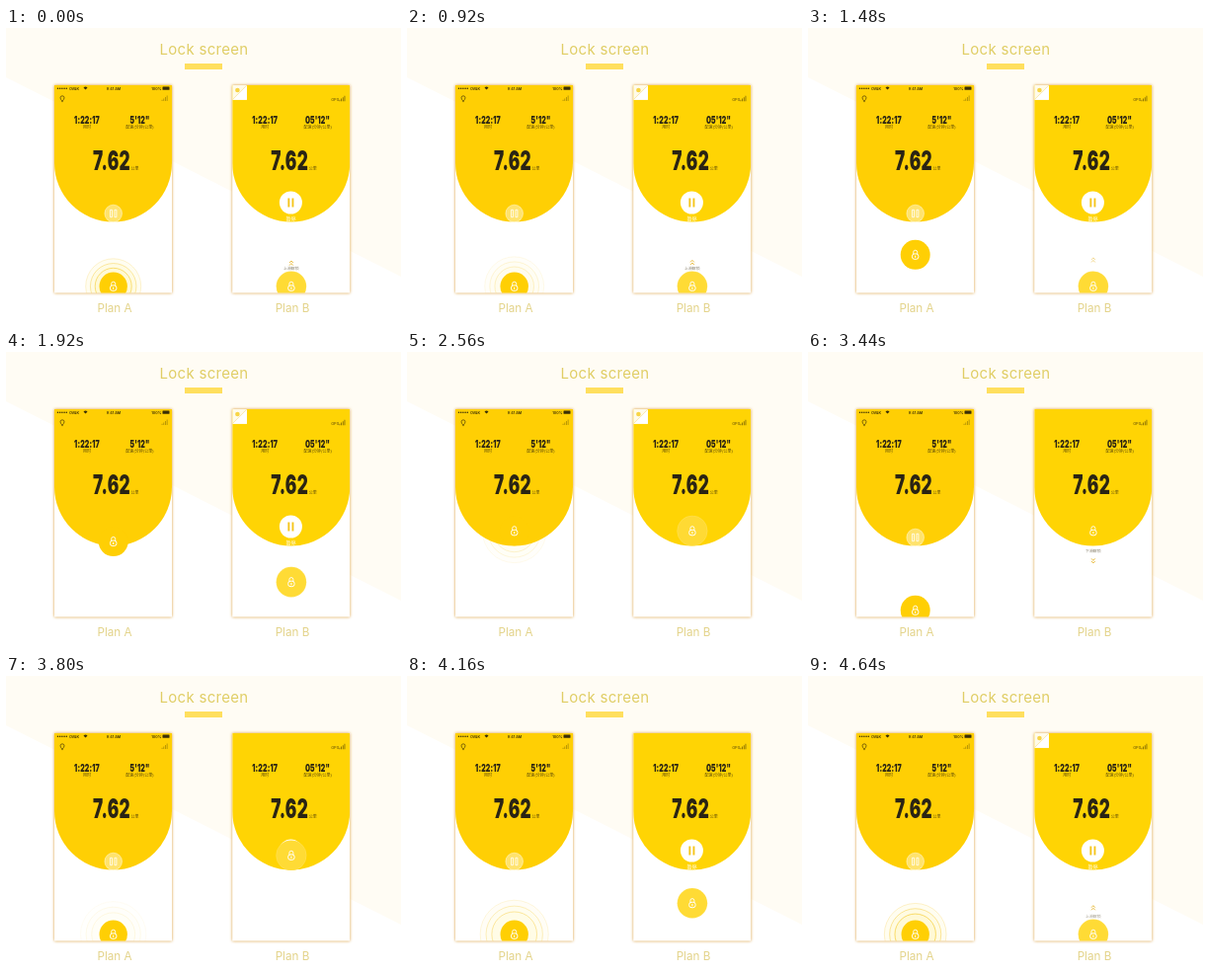
These frames come from a looping animation (400x300 px, 4680 ms). An HTML page:

```html
<!DOCTYPE html>
<html lang="en">
<head>
<meta charset="utf-8">
<title>Lock screen</title>
<style>
html, body { margin: 0; width: 100%; height: 100%; overflow: hidden; background: #fff; }
svg { display: block; width: 100%; height: 100%; }
text { font-family: Inter, "Noto Sans CJK SC", sans-serif; text-anchor: middle; }
.heavy { font-weight: 900; fill: #2a2414; letter-spacing: .02em; }
.small { font-size: 4px; fill: #5b4a08; }
.status { font-size: 3.7px; font-weight: 600; fill: #3a2f06; }
.phone { fill: #fff; filter: drop-shadow(.2px .5px 1.7px #d8962c); }
.line { fill: none; stroke-linecap: round; stroke-linejoin: round; }
.hint { font-size: 3.9px; fill: #8d8672; }
</style>
</head>
<body>
<svg viewBox="0 0 400 300">
  <defs>
    <clipPath id="clip"><rect x="49" y="58" width="119" height="210.5"/></clipPath>
    <path id="blob" d="M49 58h119v79a59.5 59.5 0 0 1-119 0z"/>
    <g id="stats"></g>
    <g id="lock">
      <path class="line" d="M-2-.9v-1.7a2 2 0 0 1 4 0v1.7" stroke="#fff" stroke-width=".9"/>
      <rect x="-3.2" y="-.9" width="6.4" height="5.4" rx="2.3" fill="none" stroke="#fff" stroke-width="1"/>
      <path class="line" d="M0 1.3v1.2" stroke="#fff" stroke-width="1.1"/>
    </g>
    <path id="chevrons" class="line" d="M-1.6-.3l1.6-1.7 1.6 1.7M-1.6 2.3l1.6-1.7 1.6 1.7" stroke="#e6b52c" stroke-width=".9"/>
    <path id="signal" d="M0 5.5v-1.4h.9v1.4zM1.7 5.5v-2.6h.9v2.6zM3.4 5.5v-4h.9v4zM5.1 5.5v-5.5h.9v5.5z" fill="#6b5705"/>
  </defs>

  <path d="M0 0h400v252L0 50z" fill="#fffcf4"/>
  <text x="200.5" y="27.3" font-size="15" letter-spacing=".3" fill="#e0ce66">Lock screen</text>
  <rect x="181" y="36" width="38" height="6" fill="#ffdf5e"/>
  <g font-size="11.7" fill="#e3d389">
    <text x="110" y="287.7">Plan A</text>
    <text x="290" y="287.7">Plan B</text>
  </g>

  <rect class="phone" x="49" y="58" width="119" height="210.5"/>
  <g clip-path="url(#clip)">
    <g id="rings" stroke="#f6cb3f" fill="#ffd200" fill-opacity=".06" stroke-width=".8"></g>
    <use href="#blob" fill="#ffcf04"/>
    <use href="#stats"/>
    <text class="heavy" transform="translate(135.5 97) scale(.64 1)" font-size="11">5'12"</text>
    <g fill="#3a2f06">
      <path d="M52.5 61.3h10" class="line" stroke="#3a2f06" stroke-width="1.6" stroke-dasharray="0 2.2"/>
      <path d="M80.5 62.6l-2-2.2q2-1.6 4 0z"/>
      <rect x="158.5" y="59.6" width="7" height="3.2" rx=".5"/>
    </g>
    <g class="status">
      <text x="69" y="62.7">OV&amp;K</text>
      <text x="109" y="62.7">9:41 AM</text>
      <text x="152.3" y="62.7">100%</text>
    </g>
    <path class="line" d="M57 74.4q-2-2.4-2-3.6a2 2 0 0 1 4 0q0 1.2-2 3.6z" stroke="#6b5705" stroke-width=".9"/>
    <use href="#signal" x="157.6" y="68.6" opacity=".5"/>
    <g id="pauseA" stroke="#fff">
      <circle cx="108.7" cy="188" r="8.8" fill="#fff" fill-opacity=".42" stroke-opacity=".6" stroke-width=".7"/>
      <path d="M105.5 184.3h2v7.4h-2zM109.9 184.3h2v7.4h-2z" fill="none" stroke-width=".8"/>
    </g>
    <g id="ballA"><circle id="discA" fill="#ffcf04"/><use href="#lock"/></g>
  </g>

  <g transform="translate(180.2)">
    <rect class="phone" x="49" y="58" width="119" height="210.5"/>
    <g clip-path="url(#clip)">
      <use href="#blob" fill="#ffd404"/>
      <use href="#stats"/>
      <text class="heavy" transform="translate(135.3 97) scale(.64 1)" font-size="11">05'12"</text>
      <text class="small" x="153" y="74.3">GPS</text>
      <use href="#signal" x="157.2" y="68.7" opacity=".8"/>
      <g id="fold">
        <path d="M0 0h14.7v14.7h-14.7z" fill="#fffbea"/>
        <circle cx="5.2" cy="5" r="2.3" fill="#f8d545"/>
        <path d="M14.7 0v14.7h-14.7z" fill="#fff"/>
        <path d="M14.7 0l-14.7 14.7" stroke="#f8e08a" stroke-width=".7"/>
      </g>
      <g id="pauseB">
        <circle cx="108.2" cy="177" r="11.5" fill="#fff"/>
        <path d="M105.2 172.6h1.9v9h-1.9zM109.3 172.6h1.9v9h-1.9z" fill="#f5c51c"/>
        <text x="108.2" y="194.6" font-size="5" fill="#fff">暂停</text>
      </g>
      <text id="hintUp" class="hint" x="108.6" y="244.8">上滑解锁</text>
      <use id="arrowUp" href="#chevrons"/>
      <text id="hintDown" class="hint" x="108.6" y="203.3">下滑解锁</text>
      <use id="arrowDown" href="#chevrons"/>
      <g id="ballB">
        <circle id="discB" r="15.3" fill="#ffdb35" stroke="#fff" stroke-opacity=".2" stroke-width=".6"/>
        <use href="#lock"/>
      </g>
    </g>
  </g>
</svg>
<script>
const LOOP = 4680, CENTER = 108.7, LOW = 261.8, LIFT = 80.5;
const $ = id => document.getElementById(id);
const set = (id, attrs) => {
  for (const name in attrs) $(id).setAttribute(name, attrs[name]);
};
const at = y => `translate(${CENTER} ${y})`;

const linear = p => p;
const sineOut = p => Math.sin(p * Math.PI / 2);
const quadInOut = p => p < .5 ? 2 * p * p : 1 - 2 * (1 - p) ** 2;

// 0 before a, 1 after b
const ramp = (t, a, b, ease = linear) => ease(Math.min(1, Math.max(0, (t - a) / (b - a))));
// Rises over a..b, falls over c..d
const during = (t, a, b, c, d, ease) => ramp(t, a, b, ease) - ramp(t, c, d, ease);
const except = (...args) => 1 - during(...args);

$('stats').innerHTML = `
  <text class="heavy" transform="translate(82 97) scale(.64 1)" font-size="11">1:22:17</text>
  <text class="heavy" transform="translate(107 143.8) scale(.64 1)" font-size="26.8">7.62</text>
  <g class="small">
    <text x="82" y="102.3">用时</text>
    <text x="135.5" y="102.3">配速(分钟/公里)</text>
    <text x="130.5" y="143.6">公里</text>
  </g>`;
$('rings').innerHTML = [0, 1, 2].map(i =>
  `<circle r="${18.5 + 4.75 * i}" stroke-opacity="${.8 - .25 * i}"/>`).join('');

function drawPlanA(t) {
  const returning = t > 2800;
  const y = returning
    ? LOW + 23 * (1 - ramp(t, 2840, 3360, sineOut))
    : LOW - LIFT * ramp(t, 1200, 2280, sineOut);
  set('ballA', { transform: at(y), opacity: returning ? 1 : 1 - ramp(t, 2640, 2800) });
  set('discA', { r: 15 - .8 * except(t, 900, 1160, 3560, 3800) });
  set('pauseA', { opacity: except(t, 1880, 1940, 2680, 2800) });

  const unlocked = during(t, 2040, 2240, 2400, 2760);
  const pulse = Math.sin(Math.PI * ramp(t, 3640, 4500)) + ramp(t, 600, 1160);
  const scale = returning || t < 1200 ? 1 + .12 * pulse : 1 + .28 * unlocked;
  set('rings', {
    transform: `${at(y)} scale(${scale})`,
    opacity: except(t, 600, 1160, 3640, 4500) + .6 * unlocked
  });
}

function drawPlanB(t) {
  set('ballB', { transform: at(LOW - LIFT * during(t, 1670, 2265, 3760, 4480, quadInOut)) });
  set('discB', { opacity: except(t, 2560, 2760, 3560, 3760) });
  set('pauseB', { visibility: t > 2265 && t < 3760 ? 'hidden' : 'visible' });

  const drift = 3.5 * (t % 780 / 780);
  set('hintUp', { opacity: except(t, 1160, 1420, 4500, LOOP) });
  set('arrowUp', { transform: at(238 - drift), opacity: except(t, 1400, 1600, 4480, 4600) });
  const opacity = during(t, 2620, 2800, 3500, 3680);
  set('hintDown', { opacity });
  set('arrowDown', { transform: at(210.5 + drift) + ' scale(1 -1)', opacity });
  set('fold', { transform: `translate(49 58) scale(${except(t, 2580, 2800, 4200, 4600, quadInOut)})` });
}

const start = performance.now();
function frame() {
  const t = (performance.now() - start) % LOOP;
  drawPlanA(t);
  drawPlanB(t);
  requestAnimationFrame(frame);
}
frame();
</script>
</body>
</html>
```
